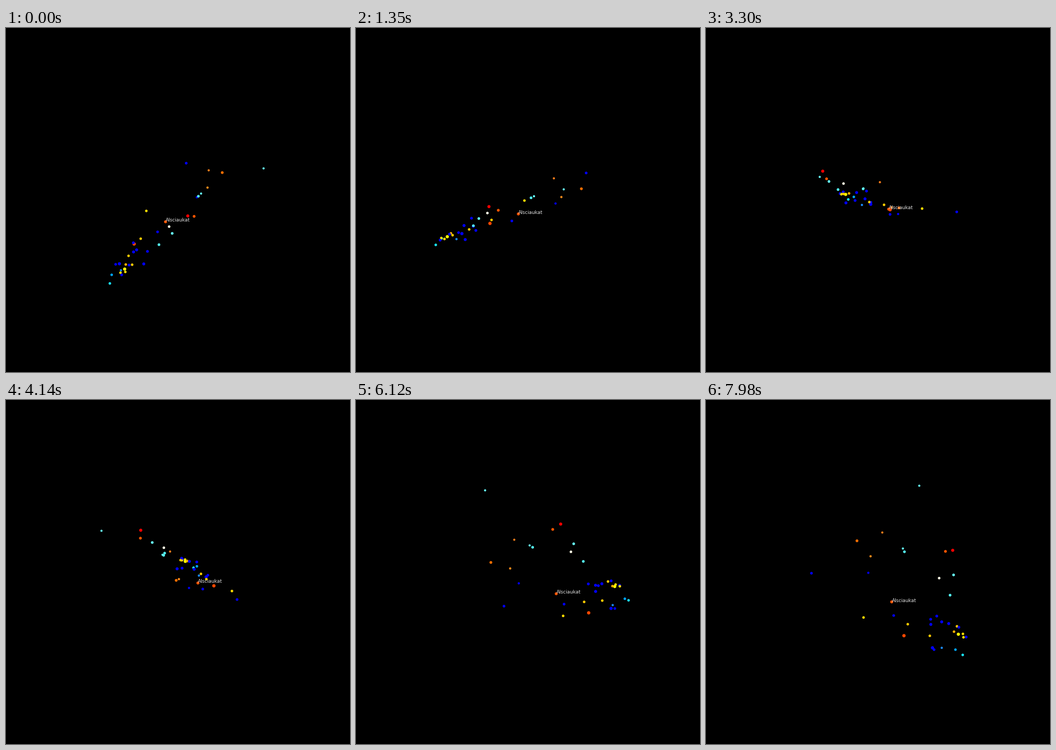
Recreate the animation shown at these times as a matplotlib script. Size 640 px wide and 640 px high, loop 8000 ms.

```python
import numpy as np
import matplotlib.pyplot as plt
from matplotlib.animation import FuncAnimation

SIZE, DPI = 640, 80
CX, CY = 334.65, 316.6        # screen point of the rotation axis
DIST = 2664                   # camera distance in pixels
ELEV = np.radians(30)
LAST = 266                    # degrees turned by the end of the loop

# x and y at the start, x after LAST degrees, diameter, colour
STARS = [
    (335.3, 251.5, 196.2, 5.0, "#0000ff"),
    (355, 315, 302, 4.2, "#0000ff"),
    (282, 379.3, 349.2, 5.0, "#0000ff"),
    (237, 399.6, 418, 5.2, "#0000ff"),
    (243, 412.8, 418.3, 5.6, "#0000ff"),
    (237.3, 416.6, 438.5, 5.6, "#0000ff"),
    (263.2, 415.6, 429.3, 5.2, "#0000ff"),
    (229, 441, 470.5, 5.2, "#0000ff"),
    (204, 439.6, 424.3, 5.0, "#0000ff"),
    (211, 438.6, 421.3, 6.0, "#0000ff"),
    (256.3, 438.9, 451.6, 5.6, "#0000ff"),
    (215.2, 459.3, 484, 5.2, "#0000ff"),
    (213.8, 450.8, 438.6, 4.2, "#1a8cff"),
    (196.6, 459.2, 464.1, 4.8, "#00a6ff"),
    (193.2, 475.2, 477.6, 4.8, "#1ae6ff"),
    (479.2, 261.2, 396.8, 4.0, "#66ffff"),
    (363, 308, 366.3, 4.0, "#66ffff"),
    (357.9, 313, 369.2, 5.0, "#55ffff"),
    (309.2, 382.1, 460.6, 5.0, "#66ffff"),
    (284.6, 403.1, 454.1, 5.0, "#55ffff"),
    (303.5, 369.5, 433.8, 4.8, "#fffde6"),
    (261.1, 340.3, 293.1, 4.8, "#ffdd00"),
    (250.6, 392, 375.4, 4.8, "#ffcc00"),
    (228, 423.9, 416.4, 4.8, "#ffcc00"),
    (234.7, 440.4, 466.9, 4.8, "#ffcc00"),
    (222.8, 440, 461.4, 4.8, "#ffb000"),
    (220.8, 448.5, 469.5, 6.0, "#ffff00"),
    (213, 455.3, 479, 4.8, "#ffe600"),
    (222, 453.8, 478, 4.8, "#ffdd00"),
    (377.1, 264.8, 328, 4.0, "#ff7f1a"),
    (402.3, 269, 280.9, 5.2, "#ff6f00"),
    (374.9, 296.9, 306.2, 4.2, "#ff8c1a"),
    (350, 350.4, 445.5, 5.2, "#ff5500"),
    (238.4, 401.8, 368.3, 6.2, "#ff4800"),
    (338.2, 349.6, 459, 5.8, "#ff0000"),
    (296.8, 360.5, 345.5, 5.6, "#ff5500"),
]
NAMED = len(STARS) - 1


def camera(deg):
    """Right, up and towards-the-viewer vectors after a turn."""
    t = np.radians(deg)
    flat = np.array([np.sin(t), np.cos(t), 0])
    right = np.array([np.cos(t), -np.sin(t), 0])
    axis = np.array([0, 0, 1])
    up = np.cos(ELEV) * axis - np.sin(ELEV) * flat
    near = np.cos(ELEV) * flat + np.sin(ELEV) * axis
    return right, up, near


def locate(x0, y0, x1):
    """Place a star in space from its sightings at both ends of the turn."""
    right0, up0, near0 = camera(0)
    right1, _, near1 = camera(LAST)
    offs = np.array([x0 - CX, CY - y0, x1 - CX])
    rows = [DIST * d + o * n for d, n, o in
            zip((right0, up0, right1), (near0, near0, near1), offs)]
    return np.linalg.solve(rows, DIST * offs)


def project(deg):
    right, up, near = camera(deg)
    depth = points @ near
    scale = DIST / (DIST - depth)
    xy = np.column_stack([CX + scale * (points @ right),
                          CY - scale * (points @ up)])
    return xy, depth


points = np.array([locate(*s[:3]) for s in STARS])
areas = np.array([(s[3] * 72 / DPI) ** 2 for s in STARS])
colors = np.array([s[4] for s in STARS])

fig = plt.figure(figsize=(SIZE / DPI, SIZE / DPI), dpi=DPI, facecolor="black")
ax = fig.add_axes([0, 0, 1, 1])
ax.set_xlim(0, SIZE)
ax.set_ylim(SIZE, 0)
ax.axis("off")

dots = ax.scatter(points[:, 0], points[:, 1], s=areas, c=colors, linewidths=0)
label = ax.text(0, 0, "Alsciaukat", color="#dddddd", fontsize=8,
                family="DejaVu Sans", zorder=5)


def draw(i):
    xy, depth = project(i * 2 // 3)   # one degree every 30 ms
    order = np.argsort(depth)
    dots.set_offsets(xy[order])
    dots.set_sizes(areas[order], DPI)
    dots.set_facecolor(colors[order])
    label.set_position(xy[NAMED])
    return dots, label


anim = FuncAnimation(fig, draw, frames=400, interval=20, repeat=True,
                     repeat_delay=0)
plt.show()
```
